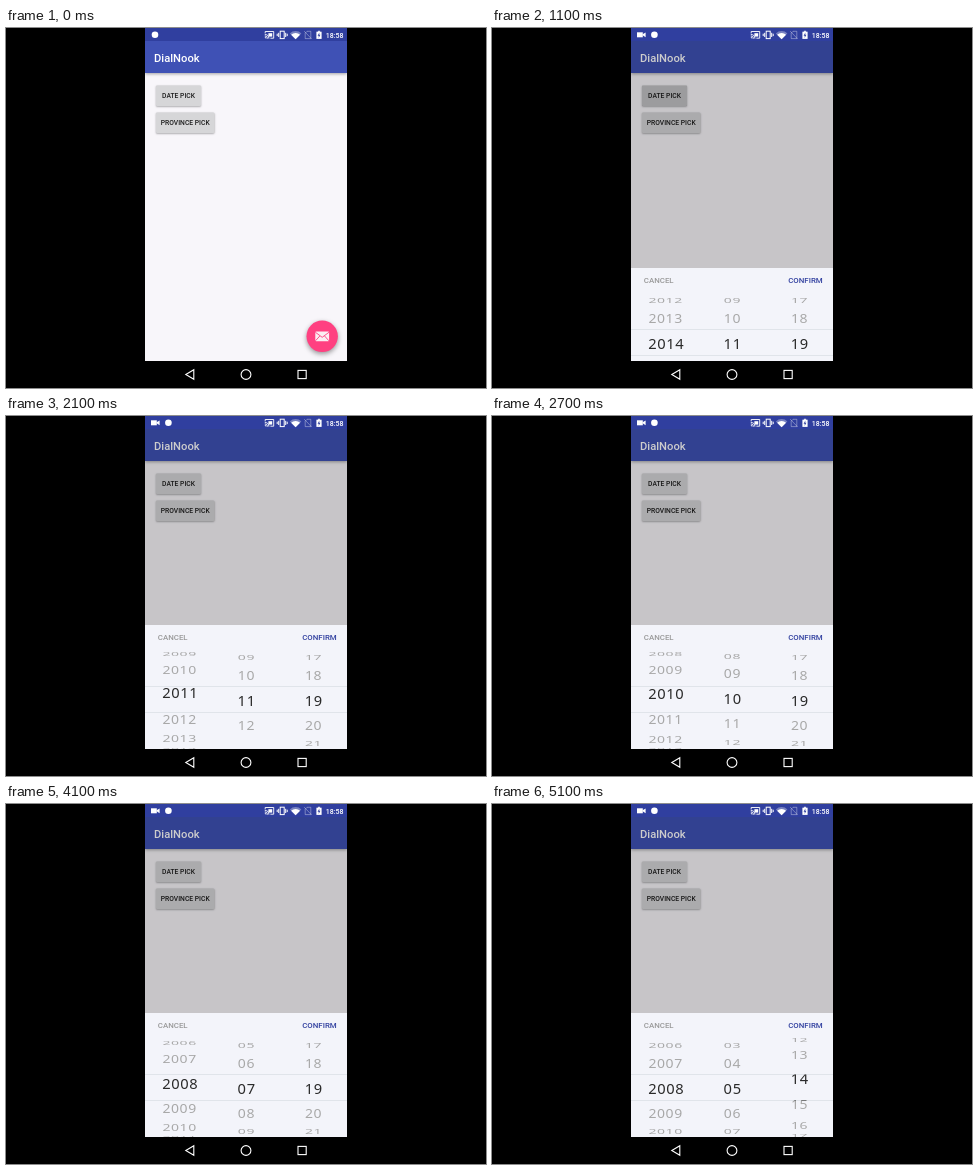
Recreate the animation shown at these times as an HTML page with a canvas. Size 480 by 360 pixels, loop 5200 ms.

```html
<!DOCTYPE html>
<html lang="en">
<head>
<meta charset="utf-8">
<title>Date picker</title>
<style>
  html, body { margin: 0; width: 100%; height: 100%; overflow: hidden; background: #000; }
  canvas { display: block; width: 480px; height: 360px; }
</style>
</head>
<body>
<canvas id="stage"></canvas>
<script>
const LOOP = 5200, STEP = 100;
const LEFT = 139, WIDTH = 202, BOTTOM = 333;
const PANEL_TOP = 209, WHEEL_TOP = 234, WHEEL_MID = 283.4, RADIUS = 49.6;
const ROW_ANGLE = Math.PI / 6, HALF_ROW = 13;
const UI = 'Roboto, sans-serif', DIGITS = '"Noto Sans", sans-serif';

// Each wheel: centre of its first digit, value range, and [time, value] stops.
const wheels = [
  { x: 160.4, min: 1900, max: 2100, stops: [[1400, 2014], [1800, 2012.6], [2100, 2011.29],
    [2400, 2010.6], [2700, 2010.25], [3000, 2010], [3700, 2010], [4200, 2008]] },
  { x: 235.8, min: 1, max: 12, stops: [[2300, 11], [2700, 10.08], [2900, 10], [3200, 10],
    [3600, 7.66], [3900, 7], [4100, 7], [4500, 5.29], [4700, 5]] },
  { x: 303, min: 1, max: 31, stops: [[4600, 19], [5100, 14.39], [5200, 14.1]] }
];

const canvas = document.getElementById('stage');
const ctx = canvas.getContext('2d');
const dpr = window.devicePixelRatio || 1;
canvas.width = 480 * dpr;
canvas.height = 360 * dpr;

const clamp = v => Math.max(0, Math.min(1, v));
const progress = (t, from, to) => clamp((t - from) / (to - from));

// Monotone cubic interpolation: smooth, without overshoot.
function valueAt(stops, t) {
  const last = stops.length - 1;
  if (t <= stops[0][0]) return stops[0][1];
  if (t >= stops[last][0]) return stops[last][1];
  const slope = i => (stops[i + 1][1] - stops[i][1]) / (stops[i + 1][0] - stops[i][0]);
  const tangent = i => {
    if (i === 0 || i === last) return 0;
    const a = slope(i - 1), b = slope(i);
    return a * b > 0 ? 2 * a * b / (a + b) : 0;
  };
  const i = stops.findIndex((s, n) => n < last && t < stops[n + 1][0]);
  const [t0, v0] = stops[i], [t1, v1] = stops[i + 1];
  const d = t1 - t0, u = (t - t0) / d, w = 1 - u;
  return v0 * (1 + 2 * u) * w * w + v1 * u * u * (3 - 2 * u)
    + d * (tangent(i) * u * w * w - tangent(i + 1) * u * u * w);
}

function rect(x, y, w, h, color) {
  ctx.fillStyle = color;
  ctx.fillRect(x, y, w, h);
}

function path(points, close) {
  ctx.beginPath();
  points.forEach(([x, y]) => ctx.lineTo(x, y));
  if (close) ctx.closePath();
}

function disc(x, y, r, color) {
  ctx.beginPath();
  ctx.arc(x, y, r, 0, Math.PI * 2);
  ctx.fillStyle = color;
  ctx.fill();
}

function text(str, x, y, size, color, weight = 500, align = 'left') {
  ctx.font = `${weight} ${size}px ${UI}`;
  ctx.textAlign = align;
  ctx.fillStyle = color;
  ctx.fillText(str, x, y);
}

function shadow(color, blur, dy) {
  ctx.shadowColor = color;
  ctx.shadowBlur = blur * dpr;
  ctx.shadowOffsetY = dy * dpr;
}

function clipped(x, y, w, h, draw) {
  ctx.save();
  ctx.beginPath();
  ctx.rect(x, y, w, h);
  ctx.clip();
  draw();
  ctx.restore();
}

function drawButton(label, y, w, h, ripple, fade) {
  ctx.save();
  shadow('rgba(0,0,0,.35)', 2, 0.8);
  ctx.beginPath();
  ctx.roundRect(150, y, w, h, 1);
  ctx.fillStyle = '#d6d6d8';
  ctx.fill();
  ctx.restore();
  if (ripple > 0 && fade > 0) {
    clipped(150, y, w, h, () => disc(172, y + h / 2, 5 + ripple * 22, `rgba(0,0,0,${0.09 * fade})`));
  }
  text(label, 150 + w / 2, y + h / 2 + 2.5, 6.74, '#1c1c1c', 500, 'center');
}

function drawFab() {
  ctx.save();
  shadow('rgba(0,0,0,.4)', 5, 2);
  disc(316.2, 308.3, 15.7, '#ff4081');
  ctx.restore();
  ctx.beginPath();
  ctx.roundRect(309.3, 303.5, 13.8, 9.8, 1);
  ctx.fillStyle = '#fbeef3';
  ctx.fill();
  ctx.strokeStyle = '#ff4081';
  ctx.lineWidth = 0.9;
  path([[309.3, 304.2], [316.2, 309.3], [323.1, 304.2]]);
  ctx.stroke();
  path([[309.5, 312.8], [313.8, 308]]);
  ctx.stroke();
  path([[322.9, 312.8], [318.6, 308]]);
  ctx.stroke();
}

function drawStatusBar(t) {
  rect(LEFT, 0, WIDTH, 13, '#303f9f');
  const shift = progress(t, 0, 200);
  disc(149 + 13.4 * shift, 6.8, 3.3, '#fff');
  if (shift > 0) {
    ctx.globalAlpha = shift;
    rect(145, 4.3, 5.8, 5, '#fff');
    path([[150.6, 6.3], [153.6, 4.4], [153.6, 9.2], [150.6, 7.3]], true);
    ctx.fill();
    ctx.globalAlpha = 1;
  }

  // Cast
  ctx.strokeStyle = '#fff';
  ctx.lineWidth = 0.9;
  path([[259.2, 5.4], [259.2, 3.5], [267.7, 3.5], [267.7, 10.2], [264.4, 10.2]]);
  ctx.stroke();
  for (const r of [1.3, 2.7, 4.1]) {
    ctx.beginPath();
    ctx.arc(258.8, 10.6, r, -Math.PI / 2, 0);
    ctx.stroke();
  }
  rect(262.4, 5.2, 3.8, 3.4, '#fff');

  // Vibrate
  ctx.lineWidth = 1;
  ctx.strokeRect(274.2, 3.2, 4, 7.4);
  for (const side of [-1, 1]) {
    path([[276.2 + side * 3.5, 4.8], [276.2 + side * 3.5, 9]]);
    ctx.stroke();
    path([[276.2 + side * 5, 5.7], [276.2 + side * 5, 8.1]]);
    ctx.stroke();
  }

  // Wi-Fi, dim outer fan with a bright inner fan
  for (const [r, color] of [[8.2, 'rgba(255,255,255,.35)'], [6.3, '#fff']]) {
    ctx.beginPath();
    ctx.moveTo(289.6, 11.2);
    ctx.arc(289.6, 11.2, r, -Math.PI * 0.75, -Math.PI * 0.25);
    ctx.fillStyle = color;
    ctx.fill();
  }

  // No SIM
  path([[299.2, 5.2], [301, 3.3], [304.8, 3.3], [304.8, 10.6], [299.2, 10.6]], true);
  ctx.strokeStyle = 'rgba(255,255,255,.4)';
  ctx.lineWidth = 0.9;
  ctx.stroke();
  path([[298.2, 3.2], [305.6, 10.9]]);
  ctx.stroke();

  // Battery
  rect(310.4, 3.7, 5.2, 7.2, '#fff');
  rect(311.9, 2.8, 2.2, 1, '#fff');
  path([[313.4, 4.6], [311.6, 7.7], [312.8, 7.7], [312.6, 10], [314.4, 6.8], [313.2, 6.8]], true);
  ctx.fillStyle = '#303f9f';
  ctx.fill();

  text('18:58', 319.8, 9.6, 7, '#fff');
}

function drawApp(t) {
  rect(LEFT, 13, WIDTH, BOTTOM - 13, '#f8f6fa');
  ctx.save();
  shadow('rgba(0,0,0,.35)', 3, 1);
  rect(LEFT, 13, WIDTH, 32, '#3f51b5');
  ctx.restore();
  text('DialNook', 148, 33.6, 11.2, '#fff');
  drawButton('DATE PICK', 57.5, 45, 20.4, progress(t, 400, 900), 1 - progress(t, 1100, 1500));
  drawButton('PROVINCE PICK', 84.5, 58.4, 20.4, 0, 0);
  drawFab();
}

function drawRows(wheel, pos, dy, color, pitch, stretch) {
  ctx.font = `400 14px ${DIGITS}`;
  ctx.textAlign = 'center';
  ctx.fillStyle = color;
  for (let n = Math.ceil(pos - 2.95); n < pos + 2.95; n++) {
    if (n < wheel.min || n > wheel.max) continue;
    const angle = (n - pos) * ROW_ANGLE;
    ctx.save();
    ctx.translate(wheel.x, WHEEL_MID + dy + RADIUS * Math.sin(angle));
    ctx.scale(1, Math.cos(angle));
    [...String(n).padStart(2, '0')].forEach((digit, i) => {
      ctx.save();
      ctx.translate(i * pitch, 6.6);
      ctx.scale(stretch, 1);
      ctx.fillText(digit, 0, 0);
      ctx.restore();
    });
    ctx.restore();
  }
}

function drawPanel(t) {
  const dy = (BOTTOM - PANEL_TOP) * (1 - progress(t, 950, 1250)) ** 2;
  const lineA = WHEEL_MID + dy - HALF_ROW, lineB = WHEEL_MID + dy + HALF_ROW;
  const wheelTop = WHEEL_TOP + dy;
  rect(LEFT, PANEL_TOP + dy, WIDTH, BOTTOM - PANEL_TOP, '#f3f4fa');
  text('CANCEL', 151.8, 223.8 + dy, 7.86, '#999');
  text('CONFIRM', 296.2, 223.8 + dy, 7.86, '#303f9f');
  rect(LEFT, lineA - 0.4, WIDTH, 0.8, '#dde0e6');
  rect(LEFT, lineB - 0.4, WIDTH, 0.8, '#dde0e6');
  for (const wheel of wheels) {
    const pos = valueAt(wheel.stops, t);
    const outer = () => drawRows(wheel, pos, dy, '#a8a8a8', 8.6, 1);
    clipped(LEFT, wheelTop, WIDTH, lineA - wheelTop, outer);
    clipped(LEFT, lineB, WIDTH, BOTTOM + dy - lineB, outer);
    clipped(LEFT, lineA, WIDTH, lineB - lineA,
      () => drawRows(wheel, pos, dy, '#2a2a2a', 9.05, 1.05));
  }
}

function drawNavBar() {
  ctx.strokeStyle = '#fff';
  ctx.lineWidth = 1.1;
  path([[179.8, 346.5], [187.8, 341.8], [187.8, 351.2]], true);
  ctx.stroke();
  ctx.beginPath();
  ctx.arc(240, 346.5, 4.9, 0, Math.PI * 2);
  ctx.stroke();
  ctx.strokeRect(292, 342.4, 8.2, 8.2);
}

function draw(t) {
  ctx.setTransform(dpr, 0, 0, dpr, 0, 0);
  rect(0, 0, 480, 360, '#000');
  clipped(LEFT, 0, WIDTH, BOTTOM, () => {
    drawApp(t);
    if (t >= 950) {
      rect(LEFT, 13, WIDTH, BOTTOM - 13, 'rgba(0,0,0,.2)');
      drawPanel(t);
    }
    drawStatusBar(t);
  });
  drawNavBar();
}

const start = performance.now();
function tick() {
  const t = Math.max(0, performance.now() - start) % LOOP;
  draw(Math.floor(t / STEP) * STEP);
  requestAnimationFrame(tick);
}
tick();
</script>
</body>
</html>
```
